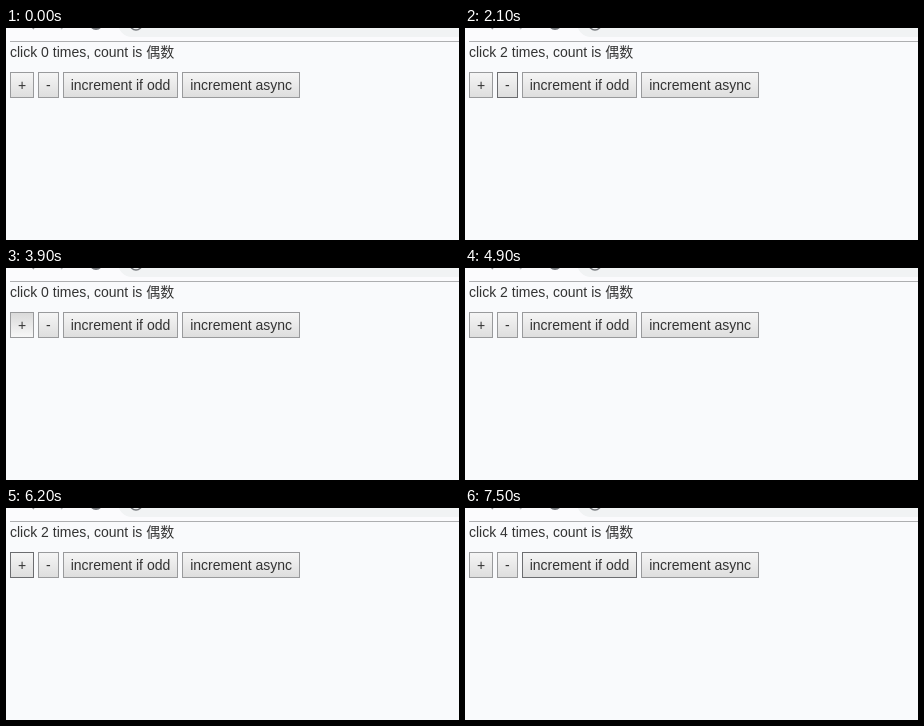
Write an HTML page that moves like this. It is 453 by 212 pixels and loops after 8000 ms.

```html
<!DOCTYPE html>
<html lang="zh-CN">
<head>
<meta charset="utf-8">
<title>Counter</title>
<style>
  html, body { margin: 0; width: 100%; height: 100%; overflow: hidden; }
  body {
    position: relative;
    background: #f9fafc;
    color: #333;
    font: 14px/20px "Liberation Sans", Arial, "Noto Sans CJK SC", "Noto Sans CJK", sans-serif;
  }
  svg { position: absolute; left: 0; top: 0; }
  #app { position: absolute; left: 4px; top: 14px; white-space: nowrap; }
  p { margin: 0 0 10px; height: 20px; }
  button {
    box-sizing: border-box;
    height: 26px;
    margin: 0;
    padding: 0 7px;
    border: 1px solid #999a9c;
    border-radius: 0;
    background: linear-gradient(#f5f5f5, #dedede);
    color: inherit;
    font: inherit;
    line-height: 24px;
    vertical-align: top;
  }
  button.hover { border-color: #6c6d70; }
  button.pressed { background: linear-gradient(#dadada, #f7f7f7); }
</style>
</head>
<body>
<svg width="453" height="14" fill="none">
  <rect width="453" height="13" fill="#fbfbfd"/>
  <rect x="112" y="-20" width="380" height="29" rx="14" fill="#f1f3f4"/>
  <g stroke="#777a7e" stroke-width="1.5">
    <path d="M23 -4l5 5" stroke="#909397"/>
    <path d="M60 -4l-5 5" stroke="#b5b7ba"/>
    <circle cx="90" cy="-5" r="6" stroke-width="2"/>
    <circle cx="130" cy="-4" r="6"/>
  </g>
  <path d="M4 13.5H453" stroke="#adaeb0"/>
</svg>
<div id="app">
  <p></p>
  <button>+</button> <button>-</button> <button>increment if odd</button> <button>increment async</button>
</div>
<script>
const LOOP = 8000;
const PLUS = 0, MINUS = 1, ODD = 2, NONE = -1;
const message = document.querySelector("p");
const buttons = [...document.querySelectorAll("button")];

// [time, count, button under the pointer, pressed]
const steps = [
  [0, 0, NONE],
  [700, 0, PLUS], [900, 0, PLUS, true], [1000, 1, PLUS],
  [1200, 2, PLUS], [1400, 2, PLUS, true], [1500, 3, PLUS],
  [1800, 3, MINUS], [2100, 2, MINUS], [2300, 2, MINUS, true],
  [2400, 1, MINUS], [2700, 0, MINUS],
  [3400, 0, PLUS], [3900, 0, PLUS, true], [4000, 1, PLUS], [4400, 2, PLUS],
  [4900, 2, NONE], [5000, 2, ODD], [5500, 2, ODD, true], [5600, 2, ODD],
  [6000, 2, MINUS], [6100, 2, NONE], [6200, 2, PLUS],
  [6800, 2, PLUS, true], [6900, 3, PLUS],
  [7000, 3, ODD], [7400, 3, ODD, true], [7500, 4, ODD],
];

let current;
function draw() {
  const time = performance.now() % LOOP;
  const step = steps.filter(([start]) => start <= time).pop();
  if (step !== current) {
    current = step;
    const [, count, active, pressed] = step;
    message.textContent = `click ${count} times, count is ${count % 2 ? "奇数" : "偶数"}`;
    buttons.forEach((button, i) => {
      button.className = i !== active ? "" : pressed ? "pressed" : "hover";
    });
  }
  requestAnimationFrame(draw);
}
draw();
</script>
</body>
</html>
```
